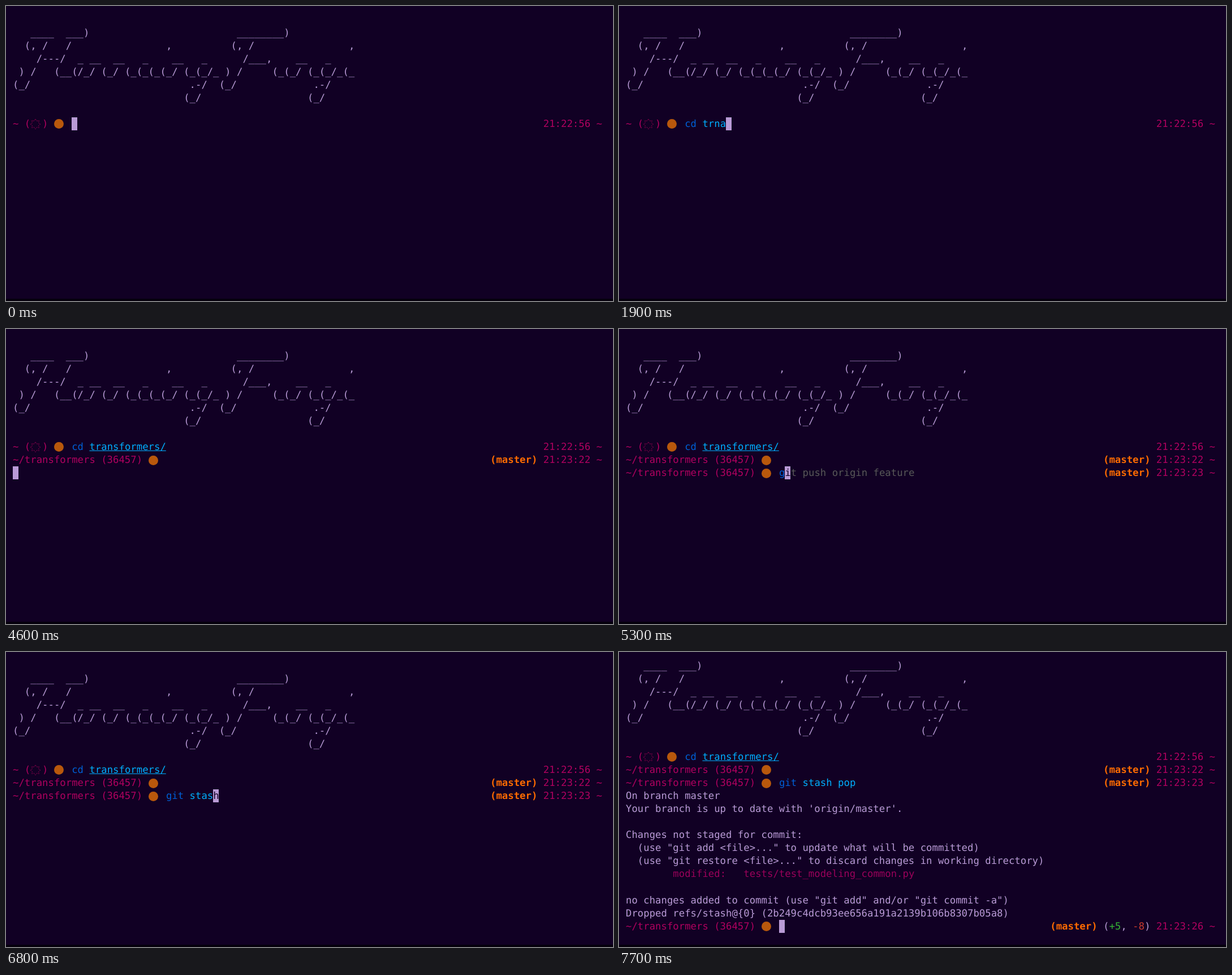
Recreate the animation shown at these times as an HTML page. Size 1073 by 522 pixels, loop 8 s.

```html
<!DOCTYPE html>
<html lang="en">
<head>
<meta charset="utf-8">
<title>Terminal session</title>
<style>
  html, body { margin: 0; width: 1073px; height: 522px; overflow: hidden; background: #110024; }
  #stage { position: relative; width: 1073px; height: 522px; overflow: hidden; }
  #stage::after { content: ""; position: absolute; left: 0; top: 518px; width: 100%; height: 4px; background: #05000c; }
  #screen { position: absolute; left: 12px; top: 12.5px; color: #b99bd6;
    font: 17.308px/25.06px "DejaVu Sans Mono", monospace; text-rendering: geometricPrecision; font-variant-ligatures: none; }
  #screen > * { position: absolute; white-space: pre; }
  .prompt { color: #b0005f; }
  .cmd { color: #005fd7; }
  .arg, .path { color: #00afff; }
  .path { text-decoration: underline 1px; text-underline-offset: 1px; text-decoration-skip-ink: none; }
  .ghost { color: #585858; }
  .branch { color: #ff6a00; font-weight: bold; }
  .file { color: #9a005a; }
  .plus { color: #35b535; }
  .minus { color: #c83a2e; }
  .cursor { width: 10px; height: 23.06px; background: #b99bd6; color: #110024; }
  .dot { width: 17px; height: 17px; margin: 3.5px 0 0 .5px; border-radius: 50%; background: #b8580c; }
  .sun { width: 20px; height: 23px; fill: none; stroke: #7d0048; }
</style>
</head>
<body>
<div id="stage"><div id="screen"></div></div>
<script>
const CELL = 10.42, LINE = 23.06, LOOP = 8000;
const screen = document.getElementById('screen');

const place = (tag, row, col, cls, body = '') =>
  `<${tag} class="${cls}" style="left:${(col * CELL).toFixed(2)}px;top:${(row * LINE).toFixed(2)}px">${body}</${tag}>`;
const text = (row, col, str, cls = '') =>
  place('span', row, col, cls, str.replace(/</g, '&lt;').replace(/>/g, '&gt;'));

const sunPoints = Array.from({ length: 16 }, (_, i) => {
  const r = i % 2 ? 6 : 9, a = i * Math.PI / 8;
  return `${(9 + r * Math.sin(a)).toFixed(1)},${(12 - r * Math.cos(a)).toFixed(1)}`;
}).join(' ');

// Banner rows as column/text pairs
const banner = [
  [3, '____', 9, '___)', 38, '________)'],
  [2, '(, /', 9, '/', 26, ',', 37, '(, /', 57, ','],
  [4, '/---/', 11, '_', 13, '__', 17, '__', 22, '_', 27, '__', 32, '_', 39, '/___,', 48, '__', 53, '_'],
  [1, ') /', 7, '(__(/_/ (_/ (_(_(_(_/ (_(_/_', 36, ') /', 44, '(_(_/ (_(_/_(_'],
  [0, '(_/', 30, '.-/', 35, '(_/', 51, '.-/'],
  [29, '(_/', 50, '(_/']
].map((cells, row) => cells.map((c, i) => i % 2 ? text(row + 1, cells[i - 1], c) : '').join('')).join('');

const clock = (row, time) => text(row, 90, time + ' ~', 'prompt');
const repoPrompt = (row, time, col = 81) =>
  text(row, 0, '~/transformers (36457)', 'prompt') + place('i', row, 23, 'dot') +
  text(row, col, '(master)', 'branch') + clock(row, time);

const homePrompt = text(8, 0, '~ (', 'prompt') +
  place('svg', 8, 3, 'sun', `<polygon points="${sunPoints}" stroke-dasharray="3 1"/>`) +
  text(8, 5, ')', 'prompt') + place('i', 8, 7, 'dot') + clock(8, '21:22:56');

const output = [
  'On branch master',
  "Your branch is up to date with 'origin/master'.",
  '',
  'Changes not staged for commit:',
  '  (use "git add <file>..." to update what will be committed)',
  '  (use "git restore <file>..." to discard changes in working directory)',
  '',
  '',
  'no changes added to commit (use "git add" and/or "git commit -a")',
  'Dropped refs/stash@{0} (2b249c4dcb93ee656a191a2139b106b8307b05a8)'
].map((line, i) => text(11 + i, 0, line)).join('') +
  text(17, 8, 'modified:   tests/test_modeling_common.py', 'file');

const command = (row, col, cmd, arg, cls) =>
  text(row, col, cmd, 'cmd') + text(row, col + cmd.length, arg, cls);

// Lines that stay once they appear
const printed = [
  [0, banner + homePrompt],
  [3300, command(8, 10, 'cd ', 'transformers/', 'path')],
  [3500, repoPrompt(9, '21:23:22')],
  [4700, repoPrompt(10, '21:23:23')],
  [7600, command(10, 26, 'git ', 'stash pop', 'arg')],
  [7700, output + repoPrompt(21, '21:23:26', 72) + text(21, 81, '(') + text(21, 82, '+5', 'plus') +
    text(21, 84, ', ') + text(21, 86, '-8', 'minus') + text(21, 88, ')')]
];

// time, row, column, command, argument, suggestion, argument style
const edits = [
  [0, 8, 10],
  [700, 8, 10, 'c', '', 'd models/'],
  [800, 8, 10, 'cd ', '', 'models/'],
  [1100, 8, 10, 'cd ', 't', 'ransformers/', 'path'],
  [1300, 8, 10, 'cd ', 'tr', 'ansformers/', 'path'],
  [1400, 8, 10, 'cd ', 'trn', '', 'path'],
  [1500, 8, 10, 'cd ', 'trn'],
  [1900, 8, 10, 'cd ', 'trna'],
  [2100, 8, 10, 'cd ', 'trn'],
  [2200, 8, 10, 'cd ', 'tr', 'ansformers/', 'path'],
  [2300, 8, 10, 'cd ', 'tra', 'nsformers/', 'path'],
  [2900, 8, 10, 'cd ', 'transformers/', '', 'path'],
  [3300, 9, 0],
  [3500, 9, 26],
  [4600, 10, 0],
  [4700, 10, 26],
  [5300, 10, 26, 'g', '', 'it push origin feature'],
  [5400, 10, 26, 'gi', '', 't push origin feature'],
  [5500, 10, 26, 'git ', '', 'push origin feature'],
  [6000, 10, 26, 'git ', 's', 'tash', 'path'],
  [6500, 10, 26, 'git ', 'st', 'ash'],
  [6600, 10, 26, 'git ', 'sta', 'sh'],
  [6800, 10, 26, 'git ', 'stas', 'h'],
  [7100, 10, 26, 'git ', 'stash'],
  [7200, 10, 26, 'git ', 'stash ', 'apply stash@{0}'],
  [7400, 10, 26, 'git ', 'stash pop'],
  [7600, 11, 0],
  [7700, 21, 26]
];

function editLine([, row, col, cmd = '', arg = '', ghost = '', cls = 'arg']) {
  const end = col + cmd.length + arg.length;
  return command(row, col, cmd, arg, cls) + text(row, end + 1, ghost.slice(1), 'ghost') +
    text(row, end, ghost[0] || ' ', 'cursor');
}

let shown;
function draw() {
  const t = performance.now() % LOOP;
  const edit = edits.findLast(e => e[0] <= t);
  if (edit !== shown) {
    shown = edit;
    screen.innerHTML = printed.filter(p => p[0] <= t).map(p => p[1]).join('') + editLine(edit);
    screen.style.marginTop = t >= 7700 ? -LINE + 'px' : 0;
  }
  requestAnimationFrame(draw);
}
draw();
</script>
</body>
</html>
```
